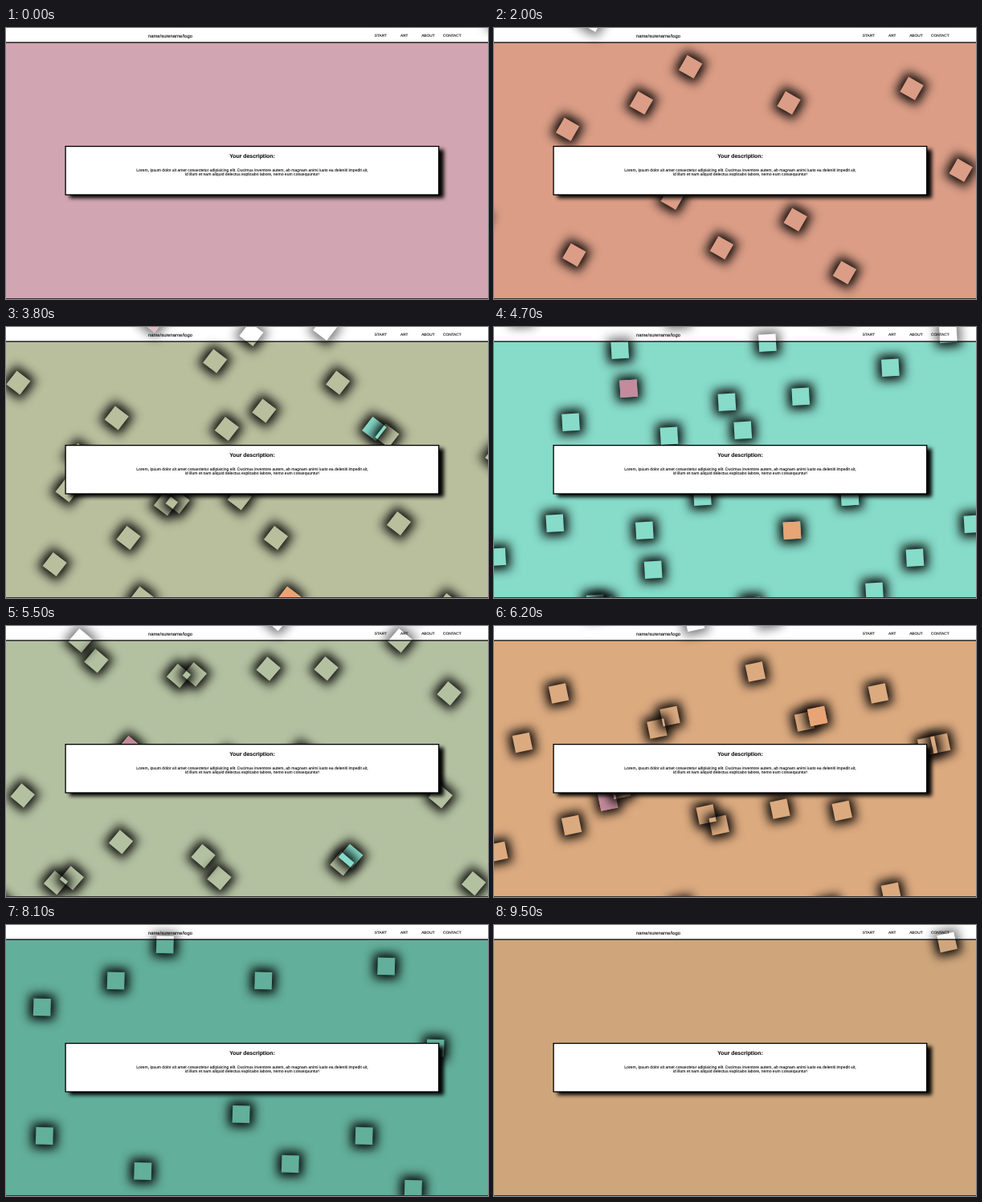
An HTML page for the animation above (9.6 s loop, 600x338 px).

```html
<!DOCTYPE html>
<html lang="en">
<head>
<meta charset="utf-8">
<title>Description page</title>
<style>
  html, body { margin: 0; width: 100%; height: 100%; overflow: hidden; }
  svg { display: block; font-family: "Liberation Sans", Arial, sans-serif; }
  .text { fill: #111; stroke: #111; stroke-width: .1; }
  .nav { font-size: 4.75px; }
  .mid { text-anchor: middle; font-size: 5.07px; }
</style>
</head>
<body>
<svg width="600" height="338" viewBox="0 0 600 338" text-rendering="geometricPrecision">
  <defs>
    <filter id="halo" filterUnits="userSpaceOnUse" x="-40" y="-40" width="80" height="80">
      <feGaussianBlur stdDeviation="6.2"/>
    </filter>
    <filter id="drop" filterUnits="userSpaceOnUse" x="50" y="130" width="520" height="110">
      <feGaussianBlur stdDeviation="2.8"/>
    </filter>
    <mask id="hole" maskUnits="userSpaceOnUse" x="-40" y="-40" width="80" height="80">
      <path fill="#fff" fill-rule="evenodd" d="M-40-40h80v80h-80zM-10.75-10.75h21.5v21.5h-21.5z"/>
    </mask>
    <!-- the shadow stays outside its see-through square -->
    <g id="shade" mask="url(#hole)">
      <rect x="-15.5" y="-15.5" width="31" height="31" filter="url(#halo)"/>
    </g>
  </defs>

  <rect id="back" width="600" height="338"/>
  <rect width="600" height="18" fill="#fff"/>
  <path d="M0 18H600" stroke="#111" stroke-width="1.3"/>
  <g id="squares"></g>
  <rect width="600" height="17.4" fill="#fff" opacity=".45"/>

  <rect x="79" y="151.5" width="466" height="60.5" filter="url(#drop)"/>
  <rect x="74.1" y="147.6" width="464.6" height="60.4" fill="#fff" stroke="#000" stroke-width="1.3"/>
  <path d="M0 337.5H600" stroke="#333"/>

  <g class="text">
    <text x="177" y="11.6" font-size="5.85">name/surename/logo</text>
    <g class="nav">
      <text x="458.8" y="11.3">START</text>
      <text x="491" y="11.3">ART</text>
      <text x="517.2" y="11.3">ABOUT</text>
      <text x="544" y="11.3">CONTACT</text>
    </g>
    <g class="mid">
      <text x="306.5" y="162" style="font-size:6.9px" font-weight="bold">Your description:</text>
      <text x="306.5" y="179.1">Lorem, ipsum dolor sit amet consectetur adipisicing elit. Ducimus inventore autem, ab magnam animi iusto ea deleniti impedit sit,</text>
      <text x="306.5" y="184.4">id illum et nam aliquid delectus explicabo labore, nemo eum consequuntur!</text>
    </g>
  </g>
</svg>
<script>
const LOOP = 9600, STEP = 100;
const GAP = 30.6, SPEED = 94.2, SPIN = 54.4, SIZE = 21.5;
const PINK = '#c58a9b', ORANGE = '#e8a475', TEAL = '#85dbc9';

// How far each evenly spaced column trails behind.
const lag = [62, 198, 500, 95, 366, 140, 456, 231, 349, 95,
  527, 356, 465, 231, 113, 500, 11, 434, 197];

// One flock sinks to the left, the other rises to the right.
const flocks = [
  { x: 126, vx: -17.2, y: d => -d, vy: SPEED, fills: { 4: PINK, 13: TEAL } },
  { x: -126, vx: 21.1, y: d => 927.5 - d, vy: -SPEED, fills: { 13: ORANGE } }
];

// Backdrop colours, evenly spaced in time.
const tints = [[209, 170, 189], [209, 152, 147], [232, 164, 117],
  [133, 219, 201], [232, 164, 117], [97, 175, 155], [232, 164, 117]];
const TINT_START = -.44, TINT_STEP = 1.71;

const back = document.getElementById('back');
const layer = document.getElementById('squares');

function add(parent, tag, attrs = {}) {
  const el = document.createElementNS('http://www.w3.org/2000/svg', tag);
  for (const key in attrs) el.setAttribute(key, attrs[key]);
  return parent.appendChild(el);
}

const squares = flocks.flatMap(({ x, y, vx, vy, fills }) => lag.map((d, i) => {
  const el = add(layer, 'g');
  add(el, 'use', { href: '#shade' });
  if (fills[i]) {
    add(el, 'rect', { x: -SIZE / 2, y: -SIZE / 2, width: SIZE, height: SIZE, fill: fills[i] });
  }
  return { el, x: x + GAP * i, y: y(d), vx, vy };
}));

function tintAt(t) {
  const pos = (t - TINT_START) / TINT_STEP;
  const i = Math.min(Math.floor(pos), tints.length - 2);
  const mix = tints[i].map((c, n) => Math.round(c + (tints[i + 1][n] - c) * (pos - i)));
  return `rgb(${mix})`;
}

function draw(ms) {
  const t = Math.floor((ms % LOOP) / STEP) * STEP / 1000;
  const turn = 11 + SPIN * t;
  back.setAttribute('fill', tintAt(t));
  for (const s of squares) {
    const x = s.x + s.vx * t, y = s.y + s.vy * t;
    const seen = x > -40 && x < 640 && y > -40 && y < 378;
    s.el.setAttribute('display', seen ? 'inline' : 'none');
    s.el.setAttribute('transform', `translate(${x} ${y}) rotate(${turn})`);
  }
}

const start = performance.now();
function tick() {
  draw(performance.now() - start);
  requestAnimationFrame(tick);
}
tick();
</script>
</body>
</html>
```
